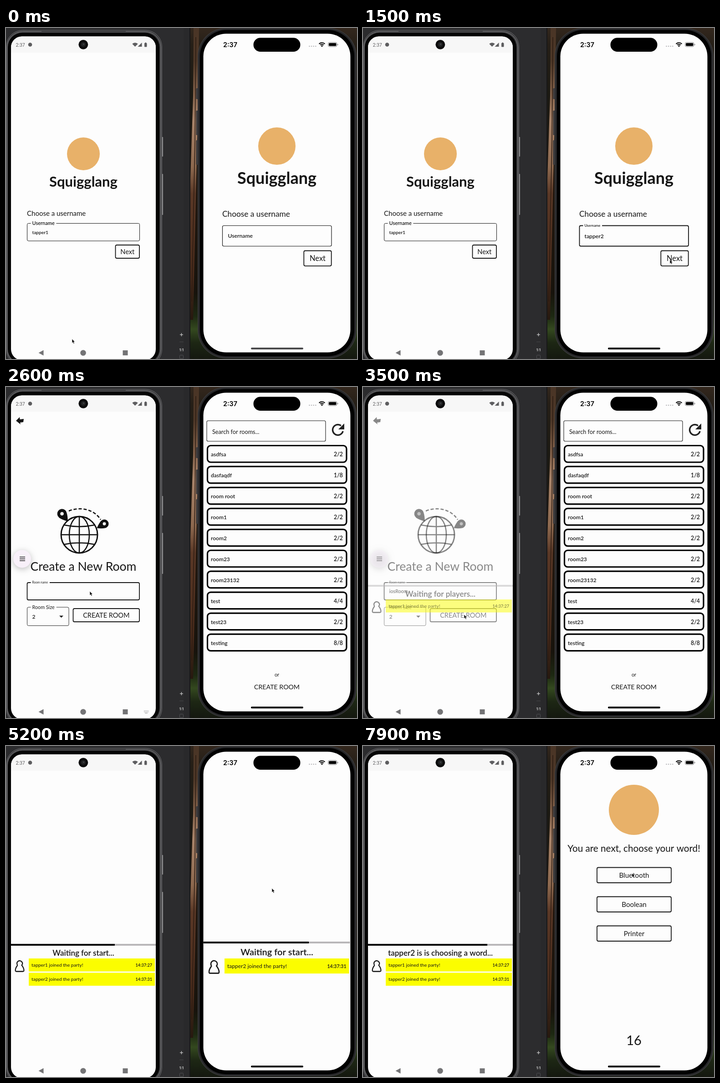
Recreate the animation shown at these times as an HTML page with a canvas. Size 771 by 726 pixels, loop 8000 ms.

```html
<!DOCTYPE html>
<html lang="en">
<head>
<meta charset="utf-8">
<title>Drawing game on two phones</title>
<style>
html, body { margin: 0; width: 100%; height: 100%; overflow: hidden; background: #2b2b2d; }
canvas { display: block; width: 771px; height: 726px; }
</style>
</head>
<body>
<canvas id="stage"></canvas>
<script>
const W = 771, H = 726, LOOP = 8000, STEP = 100, FADE = 200;
const PAPER = '#fdfdfd', INK = '#161616';
const GAME = 'Squigglang', P1 = 'tapper1', P2 = 'tapper2';

const cv = document.getElementById('stage');
const dpr = window.devicePixelRatio || 1;
cv.width = W * dpr;
cv.height = H * dpr;
const c = cv.getContext('2d');
c.scale(dpr, dpr);

const clamp = v => Math.max(0, Math.min(1, v));
const typed = (str, t, from, to) =>
  str.slice(0, Math.round(clamp((t - from) / (to - from)) * str.length));

function text(str, x, y, size, o = {}) {
  c.font = `${o.weight || 400} ${size}px ${o.font || 'Lato'}, sans-serif`;
  c.textAlign = o.align || 'left';
  c.fillStyle = o.color || INK;
  c.fillText(str, x, y);
}

function rect(x, y, w, h, color) {
  c.fillStyle = color;
  c.fillRect(x, y, w, h);
}

function round(x, y, w, h, r, fill, stroke, lw = 1) {
  c.beginPath();
  c.roundRect(x, y, w, h, r);
  if (fill) { c.fillStyle = fill; c.fill(); }
  if (stroke) { c.strokeStyle = stroke; c.lineWidth = lw; c.stroke(); }
}

function disc(x, y, r, color) {
  c.beginPath();
  c.arc(x, y, r, 0, 7);
  c.fillStyle = color;
  c.fill();
}

function poly(color, ...p) {
  c.beginPath();
  for (let i = 0; i < p.length; i += 2) c.lineTo(p[i], p[i + 1]);
  c.closePath();
  c.fillStyle = color;
  c.fill();
}

function line(lw, color, draw) {
  c.beginPath();
  draw();
  c.lineWidth = lw;
  c.strokeStyle = color;
  c.stroke();
}

function button(x, y, w, h, label, size) {
  round(x, y, w, h, 3, null, INK, 1.8);
  text(label, x + w / 2, y + h / 2 + size * 0.36, size, { align: 'center' });
}

// Outlined input: the label sits in the border when raised, inside otherwise.
function field(x, y, w, h, label, size, o) {
  round(x, y, w, h, 3, null, INK, o.lw || 1);
  if (o.raised) {
    c.font = `400 ${size}px Lato, sans-serif`;
    rect(x + 8, y - 3, c.measureText(label).width + 7, 6, PAPER);
    text(label, x + 11, y + size * 0.34, size, { weight: o.weight });
    text(o.value || '', x + 11, y + h / 2 + o.size * 0.37, o.size, { weight: 600 });
  } else {
    text(label, x + 12, y + h / 2 + o.size * 0.36, o.size, { weight: o.weight });
  }
}

function person(x, y, s) {
  c.save();
  c.translate(x, y);
  c.scale(s, s);
  line(2.3, INK, () => {
    c.arc(0, -6, 6, 2.45, 0.69);
    c.bezierCurveTo(7, 1, 10, 5, 9.3, 10);
    c.quadraticCurveTo(9, 11.5, 7, 11.5);
    c.lineTo(-7, 11.5);
    c.quadraticCurveTo(-9, 11.5, -9.3, 10);
    c.bezierCurveTo(-10, 5, -7, 1, -4.6, -2.2);
  });
  c.restore();
}

function refresh(x, y, s) {
  line(3.4 * s, '#222', () => c.arc(x, y, 11.5 * s, 0.25, 5.35));
  poly('#222', x + 14 * s, y - 14 * s, x + 14 * s, y - 1 * s, x + 1 * s, y - 1 * s);
}

function pin(x, y, r, turn) {
  c.save();
  c.translate(x, y);
  c.rotate(turn);
  c.beginPath();
  c.arc(0, 0, r, Math.PI - 0.25, 0.25);
  c.quadraticCurveTo(r * 0.7, r * 1.1, 0, r * 2);
  c.quadraticCurveTo(-r * 0.7, r * 1.1, -r, r * 0.25);
  c.fillStyle = '#111';
  c.fill();
  c.restore();
  disc(x, y, r * 0.36, PAPER);
}

function globe(x, y, r) {
  line(3, '#111', () => c.arc(x, y, r, 0, 7));
  line(2.6, '#111', () => c.ellipse(x, y, r * 0.55, r, 0, 0, 7));
  line(2.6, '#111', () => {
    c.moveTo(x, y - r); c.lineTo(x, y + r);
    c.moveTo(x - r, y); c.lineTo(x + r, y);
    for (const d of [-1, 1]) {
      c.moveTo(x - r * 0.83, y + d * r * 0.53);
      c.quadraticCurveTo(x, y + d * r * 0.36, x + r * 0.83, y + d * r * 0.53);
    }
  });
  c.setLineDash([7, 4]);
  line(2.6, '#111', () => {
    c.moveTo(x - 23, y - 52);
    c.bezierCurveTo(x, y - 62, x + 32, y - 57, x + 47, y - 33);
  });
  c.setLineDash([]);
  pin(x - 38, y - 46, 10.5, -0.65);
  pin(x + 55, y - 24, 9.5, 1.05);
}

// Layout numbers for both phones.
const droid = {
  x: 11, w: 318, mid: 170, k: 0.87,
  logo: [170, 276, 36], title: [348, 31], ask: [46, 412, 15],
  box: [46.5, 428.5, 247, 38.5], next: [240.5, 476, 52.5, 29, 14.6],
  list: { search: [18.5, 61.5, 258, 40], icon: [302, 81], x: 18, w: 304, y: 108, pitch: 40, end: 614, or: 634, make: 659 },
  lobby: { bar: 434, head: 460, size: 17, x: 50, w: 277, y: 466, h: 28.5, pitch: 31.3, who: [30, 483], font: 10.4, pad: 6 }
};
const apple = {
  x: 433, w: 324, mid: 595, k: 1,
  logo: [595, 259, 41], title: [342, 36], ask: [475, 414, 17.3],
  box: [475.5, 433.5, 239.5, 45], next: [654.3, 488.5, 60.4, 33.3, 16.5],
  list: { search: [441, 74, 261, 45], icon: [729, 94], x: 442.5, w: 305.5, y: 128.5, pitch: 45.95, end: 612, or: 635, make: 663 },
  lobby: { bar: 429, head: 459, size: 20, x: 480, w: 273.5, y: 466, h: 33, pitch: 36, who: [457, 485], font: 12, pad: 6 }
};

const ROOMS = [['asdfsa', '2/2'], ['dasfaqdf', '1/8'], ['room root', '2/2'], ['room1', '2/2'],
  ['room2', '2/2'], ['room23', '2/2'], ['room23132', '2/2'], ['test', '4/4'], ['test23', '2/2'], ['testing', '8/8']];
const MADE = ['iosRoom', '1/2'];
const ROOMS_NOW = [...ROOMS.slice(0, 2), MADE, ...ROOMS.slice(2)];

// Real seconds pass four times faster than the clock of the loop.
const startBar = t => clamp(1 - (t - 4495) * 0.000402);
const wordLeft = t => Math.min(20, 20 - (t - 7020) * 0.004);

function nameScreen(d, t) {
  const isApple = d === apple;
  disc(...d.logo, '#e8b169');
  text(GAME, d.mid, d.title[0], d.title[1], { weight: 700, align: 'center' });
  text('Choose a username', ...d.ask);
  if (isApple) {
    const on = t >= 600;
    field(...d.box, 'Username', 7.8, {
      raised: on, lw: on ? 1.8 : 1.2, value: typed(P2, t, 650, 1300), size: 12.2, weight: 600
    });
  } else {
    field(...d.box, 'Username', 11, { raised: true, value: P1, size: 10.2, weight: 600 });
  }
  button(...d.next.slice(0, 4), 'Next', d.next[4]);
}

function roomsScreen(d, t) {
  const l = d.list, k = d.k;
  const [sx, sy, sw, sh] = l.search;
  round(sx, sy, sw, sh, 3, null, INK, 1.1);
  text('Search for rooms...', sx + 12 * k, sy + sh / 2 + 6 * k, 12.7 * k);
  refresh(...l.icon, k);
  c.save();
  c.beginPath();
  c.rect(d.x, l.y - 4, d.w, l.end - l.y + 4);
  c.clip();
  const rooms = d === apple && t >= 4200 ? ROOMS_NOW : ROOMS;
  rooms.forEach(([name, size], i) => {
    const y = l.y + i * l.pitch;
    round(l.x, y, l.w, 36.5 * k, 7 * k, null, '#000', 3.2 * k);
    text(name, l.x + 7.5 * k, y + 23.5 * k, 12 * k, { weight: 600 });
    text(size, l.x + l.w - 8 * k, y + 23.5 * k, 12.3 * k, { weight: 600, align: 'right' });
  });
  c.restore();
  text('or', d.mid, l.or, 11 * k, { align: 'center' });
  text('CREATE ROOM', d.mid, l.make, 14.2 * k, { align: 'center' });
}

function createScreen(d, t) {
  poly(INK, 22, 74, 30, 66, 30.5, 71, 39, 70, 38, 77, 31, 78, 32, 82);
  globe(161, 324, 40);
  text('Create a New Room', 170, 403, 26.5, { align: 'center' });
  const on = t >= 2600;
  field(46.5, 429, 246.5, 38, 'Room name', 6.6, {
    raised: on, lw: on ? 1.8 : 1, value: typed('iosRoom', t, 2700, 3200), size: 10.8
  });
  field(46.5, 483, 91.5, 40.5, 'Room Size', 10.8, { raised: true, lw: 0.9, value: '2', size: 12 });
  poly(INK, 117, 501.5, 126, 501.5, 121.5, 506);
  button(147.5, 486, 145.5, 29, 'CREATE ROOM', 14.5);
  if (on) {
    c.save();
    c.shadowColor = 'rgba(0,0,0,.25)';
    c.shadowBlur = 14 * dpr;
    c.shadowOffsetY = 3 * dpr;
    disc(35.5, 377, 19.5, '#f8f0f9');
    c.restore();
    for (let i = -1; i < 2; i++) rect(30, 376.2 + i * 4, 12, 1.5, '#222');
  }
}

function lobbyScreen(d, t) {
  const l = d.lobby, isApple = d === apple;
  const waiting = t < 4500, choosing = t >= 7000;
  rect(d.x, l.bar, d.w, 4, '#b9b7b9');
  if (!waiting) rect(d.x, l.bar, d.w * (choosing && !isApple ? clamp(wordLeft(t) / 20) : startBar(t)), 4, '#000');
  const head = waiting ? 'Waiting for players...'
    : choosing && !isApple ? `${P2} is is choosing a word...` : 'Waiting for start...';
  text(head, d.mid, l.head, l.size, { weight: 600, align: 'center' });
  const log = [];
  if (!isApple && t >= 3500) log.push([P1, '14:37:27']);
  if (t >= 4500) log.push([P2, '14:37:31']);
  if (log.length) person(...l.who, isApple ? 1.17 : 1);
  log.forEach(([name, time], i) => {
    const y = l.y + i * l.pitch, base = y + l.h / 2 + l.font * 0.37;
    rect(l.x, y, l.w, l.h, '#fbfd00');
    text(name + ' joined the party!', l.x + l.pad, base, l.font);
    text(time, l.x + l.w - l.pad, base, l.font * 0.88, { align: 'right', weight: 600 });
  });
}

function wordScreen(d, t) {
  disc(595, 140, 55, '#e8b169');
  text('You are next, choose your word!', 595, 232, 20.7, { align: 'center' });
  ['Bluetooth', 'Boolean', 'Printer'].forEach((w, i) => button(514, 266.5 + i * 64, 163, 33.5, w, 15.2));
  text(String(Math.floor(wordLeft(t))), 595, 656, 29, { align: 'center' });
}

const FLOW = {
  droid: [[0, nameScreen], [1900, roomsScreen], [2200, createScreen], [3400, lobbyScreen]],
  apple: [[0, nameScreen], [1600, roomsScreen], [4500, lobbyScreen], [7000, wordScreen]]
};

// Crossfades from one screen to the next.
function screens(d, flow, t) {
  let i = flow.length - 1;
  while (flow[i][0] > t) i--;
  const a = i ? clamp((t - flow[i][0]) / FADE) : 1;
  if (a < 1) {
    c.globalAlpha = 1 - a;
    flow[i - 1][1](d, t);
  }
  c.globalAlpha = a;
  flow[i][1](d, t);
  c.globalAlpha = 1;
}

function vertical(stops) {
  const g = c.createLinearGradient(0, 0, 0, H);
  stops.forEach(([p, col]) => g.addColorStop(p, col));
  return g;
}

// Dark forest behind the right phone, with one slanting trunk.
function forest() {
  rect(405, 0, 366, H, vertical([[0, '#33271d'], [0.05, '#261f17'], [0.2, '#1c1a13'], [0.5, '#21170f'],
    [0.8, '#17130c'], [0.87, '#1d2812'], [0.91, '#34491f'], [0.95, '#1d2714'], [1, '#14170f']]));
  const bark = vertical([[0, '#4a3526'], [0.1, '#4e3828'], [0.2, '#85634b'], [0.28, '#a8846a'],
    [0.42, '#8d694f'], [0.5, '#5a3826'], [0.75, '#472a1b'], [0.88, '#26190f']]);
  poly(bark, 412, 0, 424, 0, 422, 160, 418, 330, 411, 640, 405, 640, 405, 330, 411, 150);
  line(1.5, '#2a1a11', () => {
    c.moveTo(417, 20);
    c.lineTo(415, 250);
    c.lineTo(408, 600);
  });
}

function backdrop() {
  rect(0, 0, W, H, '#2c2c2e');
  rect(390, 0, 14, H, '#29292b');
  rect(403, 0, 2, H, '#171718');
  forest();
  text('+', 385.5, 677, 15, { font: 'Inter', align: 'center', color: '#ccc' });
  rect(381, 688, 9, 1, '#444447');
  text('1:1', 385.5, 708.5, 8, { font: 'Inter', align: 'center', color: '#ddd', weight: 600 });
  round(381.5, 717.5, 8, 8, 1, null, '#505053');
}

function wifi(x, y, r, color) {
  c.beginPath();
  c.moveTo(x, y);
  c.arc(x, y, r, -Math.PI * 0.75, -Math.PI * 0.25);
  c.closePath();
  c.fillStyle = color;
  c.fill();
}

function droidPhone(t) {
  round(341, 239, 4, 43, 1, '#8b8b8d');
  round(341, 320, 4, 90, 1, '#8b8b8d');
  round(0.5, 5, 342, 736, 36, '#38383a', '#6a6a6d', 1);
  round(2.5, 8, 337.5, 730, 34, '#3c3c3e', '#858588', 1);
  round(4, 10.5, 333, 725, 32, '#050505');
  rect(78, 6, 185, 2, '#2e2e30');
  c.save();
  c.beginPath();
  c.roundRect(11, 18.5, 318, 710, 24);
  c.clip();
  rect(11, 18, 318, 712, PAPER);
  rect(11, 18, 318, 36, '#f7f7f7');
  screens(droid, FLOW.droid, t);
  const grey = '#5d5d5f';
  text('2:37', 21.5, 40.5, 10.5, { font: 'Roboto', color: grey });
  disc(53, 36.5, 4.3, grey);
  wifi(283.5, 41, 8.8, grey);
  poly(grey, 289.5, 41, 298.5, 41, 298.5, 32);
  round(304, 33, 5.5, 8.5, 1, grey);
  rect(305.5, 31.8, 2.5, 2, grey);
  poly('#747476', 71.5, 712.5, 82.5, 706.5, 82.5, 718.5);
  disc(169.5, 712.5, 6.3, '#747476');
  rect(256.5, 707, 11, 11, '#747476');
  if (t >= 2500 && t < 3500) {
    for (let i = 0; i < 10; i++) rect(303 + (i % 5) * 2.2, 709.5 + Math.floor(i / 5) * 2.5, 1.3, 1.4, '#a5a5a7');
    rect(305, 714.7, 6, 1.3, '#a5a5a7');
  }
  c.restore();
  disc(169.8, 36.3, 10.4, '#0c0c0d');
  disc(169.8, 36.3, 5, '#222325');
  disc(170.5, 35.5, 1.5, '#454649');
}

function applePhone(t) {
  for (const [y, h] of [[132, 24], [181, 54], [246, 54]]) round(417.5, y, 5, h, 1.5, '#39383a');
  round(421, 0, 349, 724.5, 62, '#3b3b3d');
  round(422.5, 1.5, 346, 721.5, 60.5, '#262628');
  round(426, 4.5, 339, 715.5, 57.5, '#000');
  c.save();
  c.beginPath();
  c.roundRect(433.5, 12.5, 323, 699, 50);
  c.clip();
  rect(433, 12, 324, 700, PAPER);
  screens(apple, FLOW.apple, t);
  c.restore();
  text('2:37', 492.5, 41.5, 14.3, { font: 'Inter', weight: 600, align: 'center', color: '#000' });
  round(543.5, 21.5, 103, 30.5, 15.2, '#000');
  for (let i = 0; i < 4; i++) disc(666.5 + i * 4.6, 40, 1.3, '#b9b9bb');
  for (const r of [8.8, 5.2]) line(2, '#000', () => c.arc(694, 41, r, -Math.PI * 0.76, -Math.PI * 0.24));
  wifi(694, 41.5, 3.4, '#000');
  round(707.5, 31.5, 19.5, 9.5, 3, null, '#8c8c8e');
  round(709, 33, 16.5, 6.5, 1.8, '#000');
  round(728, 34.7, 1.5, 3.2, 0.8, '#8c8c8e');
  round(538, 701, 115, 4, 2, t < 600 ? '#4a4a4c' : '#000');
}

// Pointer stops: time, x, y.
const PATH = [[0, 145, 682], [600, 560, 455], [1300, 560, 455], [1500, 674, 508], [1600, 674, 508],
  [1900, 262, 492], [2000, 262, 492], [2200, 172, 655], [2300, 172, 655], [2600, 184, 448],
  [3200, 184, 448], [3400, 222, 499], [3500, 222, 499], [4000, 729, 94], [4200, 729, 94],
  [4400, 569, 239], [4500, 569, 239], [5200, 584, 312], [6600, 552, 274], [7100, 552, 274], [7900, 591, 279]];

function pointer(t) {
  let i = 0;
  while (i < PATH.length - 2 && PATH[i + 1][0] <= t) i++;
  const [t0, x0, y0] = PATH[i], [t1, x1, y1] = PATH[i + 1];
  const p = clamp((t - t0) / (t1 - t0)), e = p * p * (3 - 2 * p);
  c.save();
  c.translate(x0 + (x1 - x0) * e, y0 + (y1 - y0) * e);
  poly('#111', 0, 0, 0, 9, 2, 7.2, 3.6, 10.6, 5.2, 9.8, 3.7, 6.6, 6.4, 6.4);
  c.lineWidth = 0.6;
  c.strokeStyle = '#fff';
  c.stroke();
  c.restore();
}

function draw(now) {
  const t = Math.floor((now % LOOP) / STEP) * STEP;
  backdrop();
  droidPhone(t);
  applePhone(t);
  pointer(t);
}

const begin = performance.now();
function tick() {
  draw(performance.now() - begin);
  requestAnimationFrame(tick);
}
tick();
</script>
</body>
</html>
```
